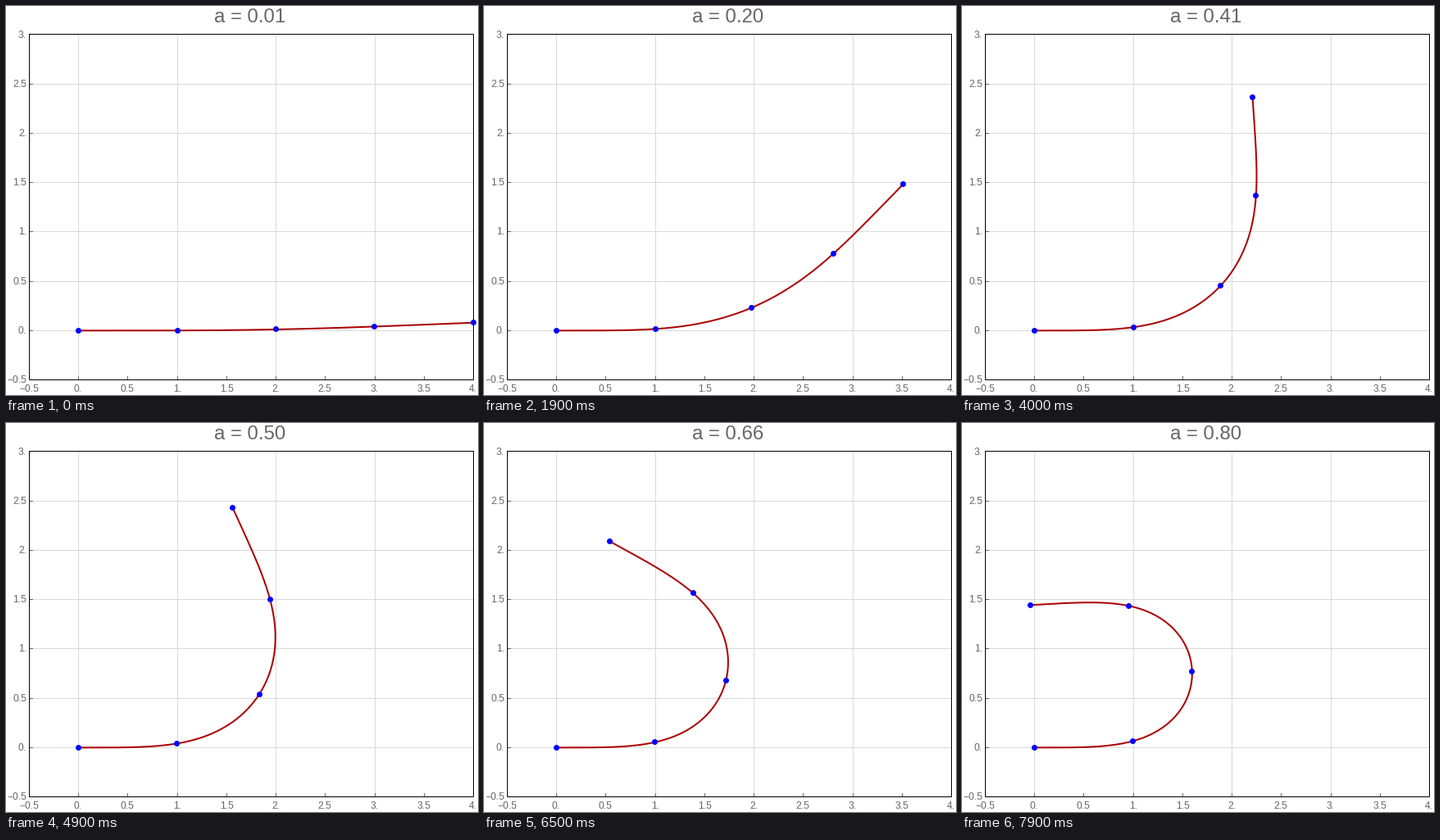
Animation of 576 by 475 pixels, one loop 8 s. Source, as a matplotlib script:

```python
import numpy as np
import matplotlib.pyplot as plt
from matplotlib.animation import FuncAnimation
from matplotlib.patches import Circle

W, H, DPI = 576, 475, 100
PX = 72 / DPI                      # points per pixel
LEFT, RIGHT, TOP, BOTTOM = 28.5, 570.5, 34.5, 456.5
UNIT = (RIGHT - LEFT) / 4.5
X0, Y0 = LEFT + UNIT / 2, 396.35
FRAMES, INTERVAL = 80, 100
GRAY, GRID = "#666666", "#d9d9d9"
EM = {".": 0.278, " ": 0.278, "=": 0.584, "\u2212": 0.584}

plt.rcParams["font.family"] = "Liberation Sans"
fig = plt.figure(figsize=(W / DPI, H / DPI), dpi=DPI, facecolor="white")
ax = fig.add_axes([0, 0, 1, 1])
ax.set_xlim(0, W)
ax.set_ylim(H, 0)
ax.axis("off")


def to_px(x, y):
    return X0 + UNIT * x, Y0 - UNIT * y


def snap(v):
    return np.floor(v) + 0.5


def rule(xs, ys, color, z):
    ax.plot(xs, ys, color=color, lw=PX, zorder=z, snap=False,
            solid_capstyle="butt", solid_joinstyle="miter")


def label(x, y, text, size=12, align=0.5):
    """Place text by its advance width, so side bearings count."""
    width = size * sum(EM.get(c, 0.556) for c in text)
    return ax.text(x - align * width, y, text, size=size * PX, color=GRAY,
                   ha="left", va="baseline", zorder=6)


def tick_text(v):
    return f"{v:.1f}".replace("-", "\u2212").removesuffix("0")


# Grid, ticks and tick labels
for v in np.arange(-0.5, 4.1, 0.5):
    x = snap(to_px(v, 0)[0])
    label(x - 0.5, 471, tick_text(v))
    if LEFT < x < RIGHT - 1:
        rule([x, x], [BOTTOM, BOTTOM - 4.5], GRAY, 2)
        if v % 1 == 0:
            rule([x, x], [TOP, BOTTOM], GRID, 1)
for v in np.arange(-0.5, 3.1, 0.5):
    y = snap(to_px(0, v)[1])
    label(25, y + 3.5, tick_text(v), align=1)
    if TOP + 1 < y < BOTTOM:
        rule([LEFT, LEFT + 4.5], [y, y], GRAY, 2)
        rule([LEFT, RIGHT], [y, y], GRID, 1)
rule([LEFT, RIGHT, RIGHT, LEFT, LEFT, RIGHT],
     [TOP, TOP, BOTTOM, BOTTOM, TOP, TOP], "black", 5)

title = label(298, 20, "a = 0.00", size=24)
curve, = ax.plot([], [], color="#aa0000", lw=2 * PX, zorder=3,
                 solid_capstyle="butt")
dots = [Circle((0, 0), 3.5, fc="blue", ec="none", zorder=4) for _ in range(5)]
for dot in dots:
    ax.add_patch(dot)

# Tangent angle per unit of a: its curvature is a smooth quadratic bump on [0, 4]
STEPS = 100
ds = 1 / STEPS
u = (np.arange(4 * STEPS) + 0.5) * ds - 2
d = np.abs(u)
angle = 2 + np.sign(u) * np.where(d < 1, 2 * d - d**3 / 3, 2 - (2 - d)**3 / 3)


def bend(a):
    x = np.concatenate(([0], np.cumsum(np.cos(a * angle)) * ds))
    y = np.concatenate(([0], np.cumsum(np.sin(a * angle)) * ds))
    return to_px(x, y)


def update(i):
    a = 0.01 * (i + 1)
    x, y = bend(a)
    curve.set_data(x, y)
    for dot, px, py in zip(dots, x[::STEPS], y[::STEPS]):
        dot.center = snap(px), snap(py)
    title.set_text(f"a = {a:.2f}")
    return [curve, title, *dots]


anim = FuncAnimation(fig, update, frames=FRAMES, interval=INTERVAL,
                     repeat=True, repeat_delay=0)
plt.show()
```
